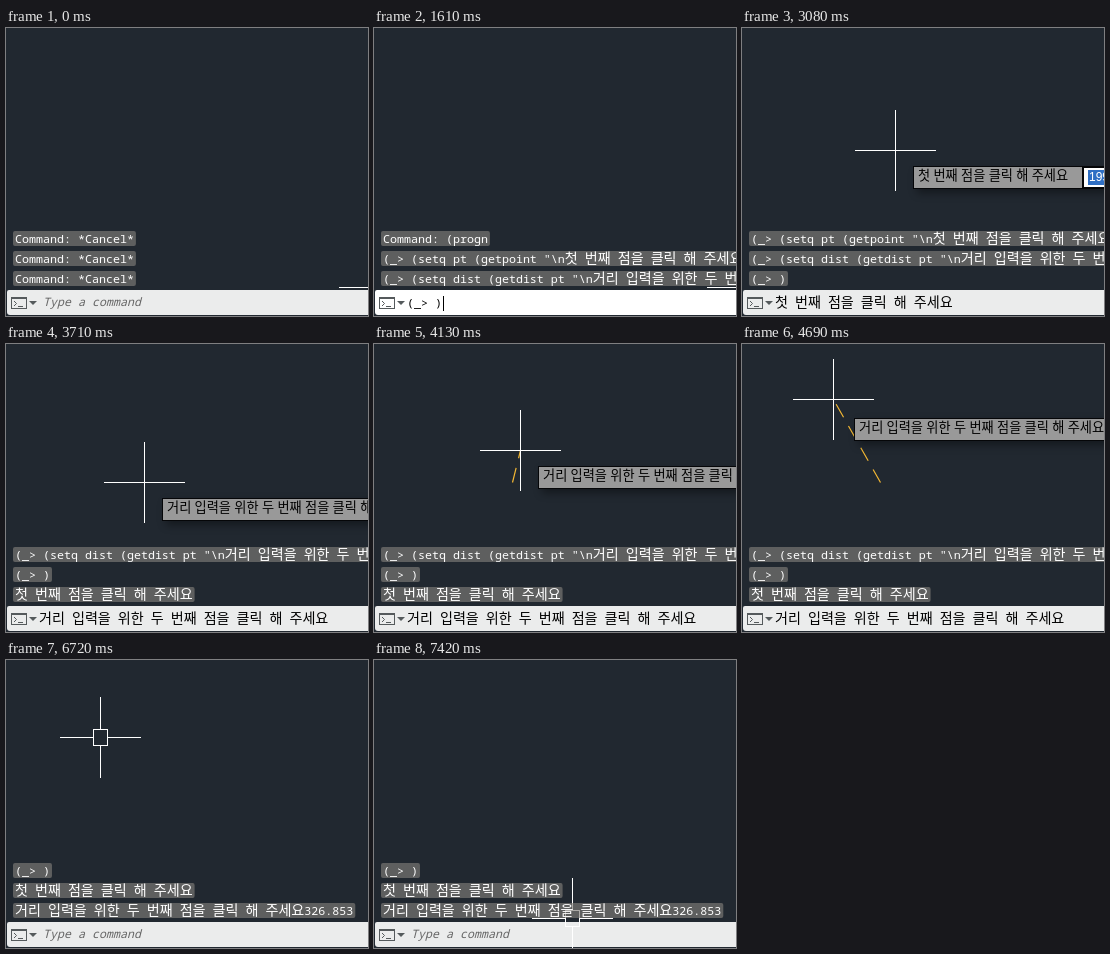
An HTML page with a canvas for the animation above (7.77 s loop, 362 px wide and 288 px high).

```html
<!DOCTYPE html>
<html lang="ko">
<head>
<meta charset="utf-8">
<title>Command line demo</title>
<style>
  html, body { margin: 0; width: 100%; height: 100%; overflow: hidden; background: #212830; }
  canvas { display: block; }
</style>
</head>
<body>
<canvas id="stage" width="362" height="288"></canvas>
<script>
const ctx = document.getElementById('stage').getContext('2d');
const LOOP = 7770, STEP = 70;

// Moments of the session, in ms
const HOVER = 630, FOCUS = 980, PASTE = 1470, ENTER = 2030, LEAVE = 2520;
const PICK_1 = 3710, PICK_2 = 5320, RETURN = 7210, RETURN_END = 7420;

const CJK = '"Noto Sans CJK KR", "Noto Sans CJK", sans-serif';
const MONO = { latin: '11.667px "Noto Sans Mono", monospace', hangul: '300 14.1px ' + CJK };
const HINT = { latin: 'italic ' + MONO.latin, hangul: MONO.hangul };
const TIP = { latin: '12px "Liberation Sans", sans-serif', hangul: '300 13.2px ' + CJK };

const FIRST = '첫 번째 점을 클릭 해 주세요';
const SECOND = '거리 입력을 위한 두 번째 점을 클릭 해 주세요';
const CANCELLED = { at: 0, line: 'Command: *Cancel*' };
const LOG = [
  CANCELLED, CANCELLED, CANCELLED,
  { at: PASTE, line: 'Command: (progn' },
  { at: PASTE + STEP, line: `(_> (setq pt (getpoint "\\n${FIRST}")))` },
  { at: PASTE + 2 * STEP, line: `(_> (setq dist (getdist pt "\\n${SECOND}")))` },
  { at: ENTER, line: '(_> )' },
  { at: PICK_1, line: FIRST },
  { at: PICK_2, line: SECOND + '326.853' }
];

// Each leg eases the crosshair from wherever it is to a new point.
const HOME = { x: 373, y: 259 };
const ANCHOR = { x: 138, y: 138 };
const LEGS = [
  { from: 2450, to: 3010, x: 153, y: 122 },
  { from: 3080, to: 3430, ...ANCHOR },
  { from: 3920, to: 4060, x: 146, y: 106 },
  { from: 4130, to: 4700, x: 91, y: 55 },
  { from: 4730, to: 4970, x: 79, y: 51 },
  { from: 6580, to: RETURN, x: 198, y: 258 }
];

const within = (t, from, to) => t >= from && t < to;

function smoothstep(t, from, to) {
  const k = Math.min(1, Math.max(0, (t - from) / (to - from)));
  return k * k * (3 - 2 * k);
}

function cursorAt(t) {
  let { x, y } = HOME;
  for (const leg of LEGS) {
    const k = smoothstep(t, leg.from, leg.to);
    x += (leg.x - x) * k;
    y += (leg.y - y) * k;
  }
  return { x: Math.round(x), y: Math.round(y) };
}

// null stands for the idle hint
function inputAt(t) {
  if (t < FOCUS || t >= PICK_2 + STEP) return null;
  if (t >= PICK_2) return '';
  if (t >= PICK_1) return SECOND;
  if (t >= ENTER + STEP) return FIRST;
  if (t >= ENTER || t < PASTE) return '';
  return t < PASTE + 2 * STEP ? '(_> ' : '(_> )';
}

function rect(x, y, w, h, color) {
  ctx.fillStyle = color;
  ctx.fillRect(x, y, w, h);
}

function roundRect(x, y, w, h, radius, color) {
  ctx.fillStyle = color;
  ctx.beginPath();
  ctx.roundRect(x, y, w, h, radius);
  ctx.fill();
}

// Walks Latin and Hangul runs, each in its own font; returns the total width.
function text(str, x, y, fonts, color) {
  let width = 0;
  for (const run of str.match(/[가-힣]+|[^가-힣]+/g) || []) {
    ctx.font = /[가-힣]/.test(run) ? fonts.hangul : fonts.latin;
    if (color) {
      ctx.fillStyle = color;
      ctx.fillText(run, x + width, y);
    }
    width += ctx.measureText(run).width;
  }
  return width;
}

function drawCrosshair({ x, y }, pickbox) {
  const gap = pickbox ? 8 : 0, arm = 41 - gap;
  rect(x - 40, y, arm, 1, '#fff');
  rect(x + gap, y, arm, 1, '#fff');
  rect(x, y - 40, 1, arm, '#fff');
  rect(x, y + gap, 1, arm, '#fff');
  if (pickbox) {
    ctx.strokeStyle = '#fff';
    ctx.lineWidth = 1;
    ctx.strokeRect(x - 6.5, y - 7.5, 14, 16);
  }
}

function drawRubberBand({ x, y }) {
  ctx.save();
  ctx.strokeStyle = '#f2b733';
  ctx.lineWidth = 1.2;
  ctx.setLineDash([15, 10]);
  ctx.beginPath();
  ctx.moveTo(ANCHOR.x + .5, ANCHOR.y + .5);
  ctx.lineTo(x + .5, y + .5);
  ctx.stroke();
  ctx.restore();
}

function drawTooltip(x, y, str) {
  const w = Math.round(text(str, 0, 0, TIP)) + 20;
  ctx.save();
  ctx.shadowColor = 'rgba(0,0,0,.4)';
  ctx.shadowBlur = 9;
  ctx.shadowOffsetX = ctx.shadowOffsetY = 4;
  rect(x, y, w + 90, 23, '#050608');
  ctx.restore();
  rect(x + 1, y + 1, w - 2, 21, '#999');
  text(str, x + 5, y + 14, TIP, '#000');
  rect(x + w + 1, y + 2, 88, 19, '#fff');
  rect(x + w + 5, y + 4, 48, 15, '#2f6fc4');
  text('1992.37', x + w + 6, y + 15, TIP, '#fff');
}

function drawHistory(t) {
  LOG.filter(entry => entry.at <= t).slice(-3).forEach(({ line }, i) => {
    const y = 203 + i * 20;
    roundRect(7, y, text(line, 0, 0, MONO) + 4, 15, 2, 'rgba(128,125,121,.65)');
    text(line, 9, y + 12, MONO, '#fff');
  });
}

function drawIcon() {
  const color = '#555a5c';
  ctx.strokeStyle = color;
  ctx.lineWidth = 1;
  ctx.strokeRect(5.5, 269.5, 15, 11);
  rect(5, 269, 16, 2, color);
  ctx.beginPath();
  ctx.moveTo(8, 273);
  ctx.lineTo(10.5, 275.5);
  ctx.lineTo(8, 278);
  ctx.stroke();
  rect(12, 278, 5, 1, color);
  ctx.fillStyle = color;
  ctx.beginPath();
  ctx.moveTo(23, 273);
  ctx.lineTo(31, 273);
  ctx.lineTo(27, 277);
  ctx.fill();
}

function drawInput(input, hovered, focused) {
  roundRect(1, 262, 364, 25, [2, 0, 0, 3], hovered ? '#fff' : 'rgba(255,255,255,.91)');
  drawIcon();
  if (input === null) {
    text('Type a command', 37, 278, HINT, '#666');
    return;
  }
  const width = text(input, 33, 279, MONO, '#000');
  if (focused) rect(Math.round(34 + width), 268, 1, 15, '#000');
}

function draw(t) {
  const input = inputAt(t);
  const cursor = cursorAt(t);
  const measuring = within(t, PICK_1, PICK_2);
  const hovered = within(t, HOVER, LEAVE) || within(t, RETURN, RETURN_END);

  rect(0, 0, 362, 288, '#212830');
  if (measuring) drawRubberBand(cursor);
  drawCrosshair(cursor, input === null);
  if (within(t, LEAVE, PICK_2)) {
    const trail = cursorAt(t - STEP);   // the tooltip lags by one step
    drawTooltip(trail.x + 18, trail.y + 16, measuring ? SECOND : FIRST);
  }
  drawHistory(t);
  drawInput(input, hovered, within(t, FOCUS, LEAVE));
}

const start = performance.now();
function tick() {
  const t = (performance.now() - start) % LOOP;
  draw(Math.floor(t / STEP) * STEP);
  requestAnimationFrame(tick);
}
tick();
</script>
</body>
</html>
```
